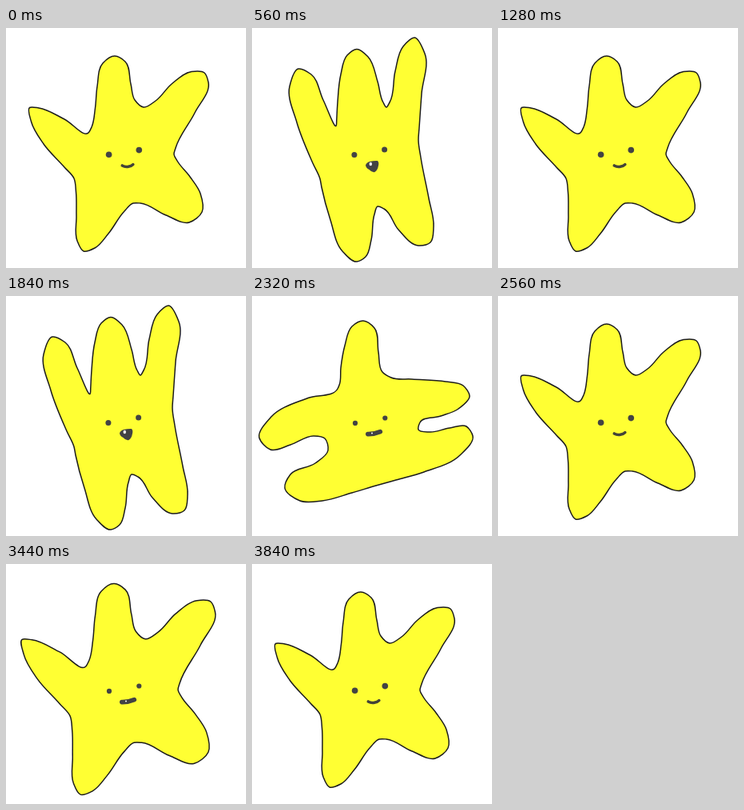
Write an HTML page that moves like this. It is 300x300 px and loops after 4240 ms.

```html
<!DOCTYPE html>
<html lang="en">
<head>
<meta charset="utf-8">
<title>Stretching star</title>
<style>
html, body { margin: 0; width: 100%; height: 100%; overflow: hidden; background: #fff; }
svg { display: block; width: 100%; height: 100%; }
</style>
</head>
<body>
<svg viewBox="0 0 300 300">
  <path id="body" fill="#ffff33" stroke="#1c1c1c" stroke-width="1.5" stroke-linejoin="round"/>
  <g fill="#434343">
    <circle id="eyeL"/>
    <circle id="eyeR"/>
  </g>
  <g id="smile" fill="none" stroke="#434338" stroke-width="3.6" stroke-linecap="round">
    <path d="M145.3 172Q149 174 153 173.2Q157 172.6 158.8 170.6"/>
  </g>
  <g id="open">
    <path d="M142 171.5Q143 168 147 167Q153 165.5 157 166Q159 168 158 172Q157 178 153.500 180Q150 181 146.500 177Q142.500 175 142 171.500Z" fill="#434343"/>
    <ellipse cx="148.300" cy="170" rx="1.700" ry="2.300" fill="#fff"/>
  </g>
  <g id="flat">
    <path d="M144.800 172.600Q153 172.800 160.300 169.700" fill="none" stroke="#434343" stroke-width="5.600" stroke-linecap="round"/>
    <circle cx="150" cy="171.600" r="1" fill="#fff"/>
  </g>
</svg>
<script>
// Outline points, clockwise from the left of the head; one line per limb.
const toPoints = text => text.trim().split(/\s+/).map(p => p.split(',').map(Number));

const star = toPoints(`
  103.5,130.5 107,124 111.5,100 114,73 121,44 136,35 149,42 156,70
  161,90 172,99 187,91 207,70 232,54.5 248,56 253,68 236,106
  212,150 210,158 214,166 230,186 243,207 245,230 229,243 200,234
  168,219 159,219 148,229 128,257 111,275 97,279 89,266 88,235
  87.5,205 85,188 73,174 47,145 31.5,117 29.5,99.5 41,100 73,114`);

const tall = toPoints(`
  105.5,121 105.8,115 107,93 111,58 119,34 131,26.5 145,36 157,67
  164,93 168,99 172,93 179,54 189,23 203,12 216,32 212,82
  209,125 208,140 211,162 221,213 227,248 223,268 208,272 183,252
  165,226 157,223 153,233 149,265 142,286 131,292 113,279 98,240
  87,199 85,188.5 76,169 56,118 47,73 58,51 74,58 89,90`);

const wide = toPoints(`
  107,116 109.5,110 111,90 116,62 125,38 139,31 153,40 158,70
  163,95 174,102 200,104 242,107 264,112 272,125 258,141 236,150
  210,158 208,167 222,170 247,165 268,163 276,175 260,199 215,220
  180,230 155,237 125,246 88,256 60,256 41,240 48,223 79,209
  95,193 91,178 77,175 48,186 23,192 9,177 24,151 70,127.5`);

const mix = (a, b, k) => a.map(([x, y], i) => [x + (b[i][0] - x) * k, y + (b[i][1] - y) * k]);
const grow = (pts, k) => pts.map(([x, y]) => [147 + (x - 147) * k, 165 + (y - 165) * k]);
const dropLegs = (pts, k) => pts.map(([x, y]) => [x, y + Math.max(0, y - 190) * k]);

// Smooth closed curve whose tangents are weighted by chord length.
function outline(pts) {
  const n = pts.length;
  const chord = pts.map((p, i) => {
    const q = pts[(i + 1) % n];
    return Math.hypot(q[0] - p[0], q[1] - p[1]) || 1e-6;
  });
  const slope = pts.map((p, i) => {
    const h = (i + n - 1) % n, a = pts[h], b = pts[(i + 1) % n];
    const d = chord[h], e = chord[i];
    return [0, 1].map(c => ((p[c] - a[c]) / d * e + (b[c] - p[c]) / e * d) / (d + e));
  });
  const fmt = v => v.toFixed(2);
  let d = 'M' + pts[0].map(fmt);
  pts.forEach((p, i) => {
    const j = (i + 1) % n, q = pts[j], k = chord[i] / 3;
    const c1 = [0, 1].map(c => p[c] + slope[i][c] * k);
    const c2 = [0, 1].map(c => q[c] - slope[j][c] * k);
    d += 'C' + [...c1, ...c2, ...q].map(fmt).join(' ');
  });
  return d + 'Z';
}

const eyes = {
  smile: [128.6, 158.2, 166.3, 152.6, 3.8],
  open: [127.9, 158.5, 165.6, 152, 3.5],
  flat: [129, 158.9, 166.3, 152.5, 3.1]
};

const pose = (start, pts, face) => ({ start, d: outline(pts), face });
const poses = [
  pose(0, star, 'smile'),
  pose(560, tall, 'open'),
  pose(640, dropLegs(mix(star, tall, 1.04), 0.035), 'open'),
  pose(800, dropLegs(mix(star, tall, 0.6), 0.1), 'open'),
  pose(880, grow(star, 1.08), 'flat'),
  pose(960, grow(mix(star, wide, 0.65), 1.06), 'flat'),
  pose(1040, wide, 'flat'),
  pose(1200, mix(star, wide, 0.5), 'smile')
];

const LOOP = 4240, CYCLE = 1280;
const el = id => document.getElementById(id);
let shown;

function draw(time) {
  const t = time % LOOP % CYCLE;
  const now = poses.filter(p => p.start <= t).pop();
  if (now === shown) return;
  shown = now;
  el('body').setAttribute('d', now.d);
  for (const face in eyes) el(face).style.display = face === now.face ? '' : 'none';
  const [lx, ly, rx, ry, r] = eyes[now.face];
  [['eyeL', lx, ly], ['eyeR', rx, ry]].forEach(([id, x, y]) => {
    el(id).setAttribute('cx', x);
    el(id).setAttribute('cy', y);
    el(id).setAttribute('r', r);
  });
}

const begin = performance.now();
function tick() {
  draw(performance.now() - begin);
  requestAnimationFrame(tick);
}
tick();
</script>
</body>
</html>
```
